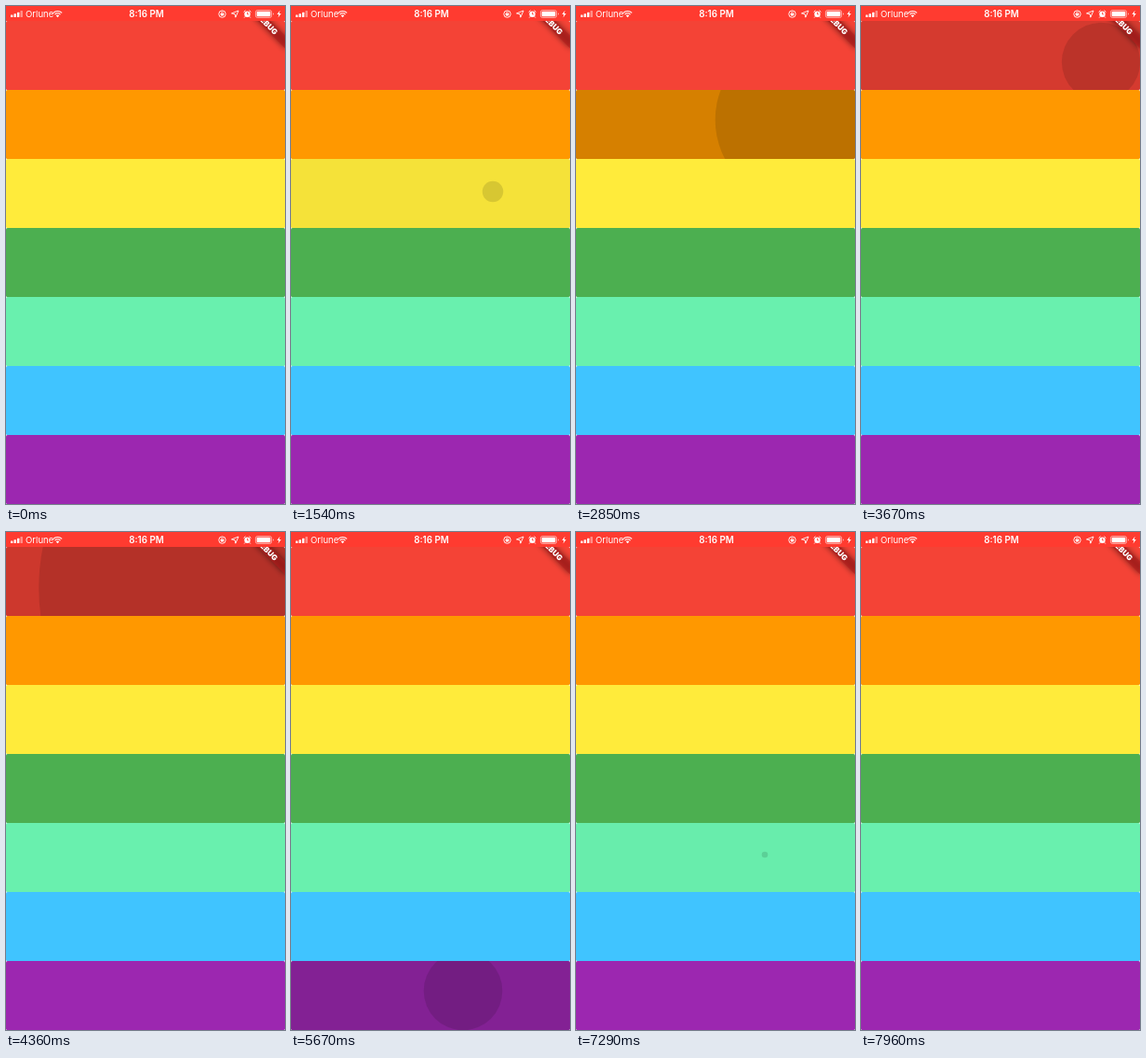
An HTML page for the animation above (8 s loop, 300 px wide and 534 px high).

```html
<!DOCTYPE html>
<html lang="en">
<head>
<meta charset="utf-8">
<title>Ripple rows</title>
<style>
  html, body { margin: 0; width: 100%; height: 100%; overflow: hidden; background: #fafafa; }
  svg { display: block; width: 100vw; height: 100vh; }
  text { font-family: Inter, Roboto, sans-serif; }
</style>
</head>
<body>
<svg viewBox="0 0 300 534">
  <defs>
    <filter id="soft" x="-50%" y="-100%" width="200%" height="300%"><feGaussianBlur stdDeviation="3"/></filter>
  </defs>
  <g id="rows"></g>

  <!-- corner ribbon -->
  <g transform="translate(300 0) rotate(45)">
    <rect x="-32" y="22.4" width="64" height="9.6" fill="#000" fill-opacity=".5" filter="url(#soft)"/>
    <rect x="-32" y="22.4" width="64" height="9.6" fill="#b71c1c" fill-opacity=".63"/>
    <text y="30.2" font-size="8.2" font-weight="900" fill="#fff" text-anchor="middle">DEBUG</text>
  </g>

  <!-- status bar -->
  <rect width="300" height="16" fill="#ff3b30"/>
  <g fill="#fff">
    <rect x="5" y="9.4" width="2.4" height="2.6" rx=".5"/>
    <rect x="8.5" y="8.2" width="2.4" height="3.8" rx=".5"/>
    <rect x="12" y="6.7" width="2.4" height="5.3" rx=".5"/>
    <rect x="15.5" y="5" width="2.4" height="7" rx=".5" fill-opacity=".45"/>
    <text x="21" y="11.8" font-size="9.6">Orlune</text>
    <text x="151" y="11.8" font-size="9.8" font-weight="600" text-anchor="middle">8:16 PM</text>
    <path d="M55.5 12.2l-1.8-1.9a2.6 2.6 0 0 1 3.6 0z"/>
    <path d="M250 5l-3.2 7.2-.7-3.6-3.6-.7z" fill="none" stroke="#fff" stroke-width=".9" stroke-linejoin="round"/>
    <rect x="230.8" y="7.8" width="3.4" height="2.7" rx=".4"/>
    <circle cx="259.5" cy="8.7" r="3.2"/>
    <rect x="269.6" y="5.8" width="14.8" height="5.4" rx="1"/>
    <path d="M287 7.2q1.4 1.3 0 2.6z"/>
    <path d="M294.6 4.8l-3.2 4.2h2l-.8 3.4 3.2-4.3h-2z"/>
  </g>
  <g fill="none" stroke="#fff" stroke-width="1.1">
    <path d="M50.8 7.4a6.7 6.7 0 0 1 9.4 0M52.5 9.1a4.3 4.3 0 0 1 6 0"/>
    <circle cx="232.5" cy="8.6" r="3.7" stroke-width=".9"/>
    <path d="M231.5 8v-.8a1 1 0 0 1 2 0V8" stroke-width=".6"/>
    <path d="M255.6 6.5l1.9-1.8M263.4 6.5l-1.9-1.8M257.1 11.4l-.9 1.1M261.9 11.4l.9 1.1" stroke-width="1"/>
    <path d="M259.5 6.7v2.2h1.7" stroke="#ff3b30" stroke-width=".8"/>
    <rect x="268.4" y="4.6" width="17.2" height="7.8" rx="2" stroke-width=".7" stroke-opacity=".8"/>
  </g>
</svg>
<script>
const LOOP = 8000, WIDTH = 300, TOP = 16, ROW = 74;
const FADE = 200, GROW = 1000, FAST = 0.8; // ms, ms, px per ms after release
const HIGHLIGHT = 0.16, SPLASH = 0.12;
const colors = ['#f44336', '#ff9800', '#ffeb3b', '#4caf50', '#69f0ae', '#40c4ff', '#9c27b0'];

// row, touch point, press time, release time
const taps = [
  [4, 205, 348, 20, 100],
  [3, 212, 275, 615, 1040],
  [2, 217, 199, 1490, 2010],
  [1, 239, 122, 2483, 3050],
  [0, 258, 60, 3510, 4500],
  [6, 185, 492, 5448, 5970],
  [5, 197, 417, 6400, 6940],
  [4, 203, 346, 7275, 7740],
].map(([row, x, y, down, up]) => {
  const top = TOP + row * ROW;
  const reach = Math.hypot(Math.max(x, WIDTH - x), Math.max(y - top, top + ROW - y));
  return { row, x, y, down, up, reach };
});

const clamp = v => Math.min(1, Math.max(0, v));

function add(parent, tag, attrs) {
  const node = document.createElementNS('http://www.w3.org/2000/svg', tag);
  for (const key in attrs) node.setAttribute(key, attrs[key]);
  return parent.appendChild(node);
}

const layer = document.getElementById('rows');
const rows = colors.map((fill, i) => {
  const box = { x: 0, y: TOP + i * ROW, width: WIDTH, height: ROW, rx: 1.6 };
  add(add(layer, 'clipPath', { id: 'clip' + i }), 'rect', box);
  add(layer, 'rect', { ...box, fill });
  const shade = add(layer, 'rect', { ...box, 'fill-opacity': 0 });
  const group = add(layer, 'g', { 'clip-path': `url(#clip${i})` });
  const splash = add(group, 'circle', { r: 0, 'fill-opacity': 0 });
  return { shade, splash };
});

function paint(t) {
  rows.forEach(({ shade, splash }, i) => {
    const tap = taps.find(p => p.row === i && t >= p.down && t < p.up + FADE);
    let highlight = 0, alpha = 0;
    if (tap) {
      const held = Math.min(t, tap.up) - tap.down;
      const after = Math.max(0, t - tap.up);
      const radius = Math.min(tap.reach, tap.reach * held / GROW + after * FAST);
      alpha = SPLASH * (1 - clamp(after / FADE));
      highlight = HIGHLIGHT * clamp(clamp(held / FADE) - after / FADE);
      splash.setAttribute('cx', tap.x);
      splash.setAttribute('cy', tap.y);
      splash.setAttribute('r', radius);
    }
    shade.setAttribute('fill-opacity', highlight);
    splash.setAttribute('fill-opacity', alpha);
  });
}

const start = performance.now();
function tick() {
  paint((performance.now() - start) % LOOP);
  requestAnimationFrame(tick);
}
tick();
</script>
</body>
</html>
```
